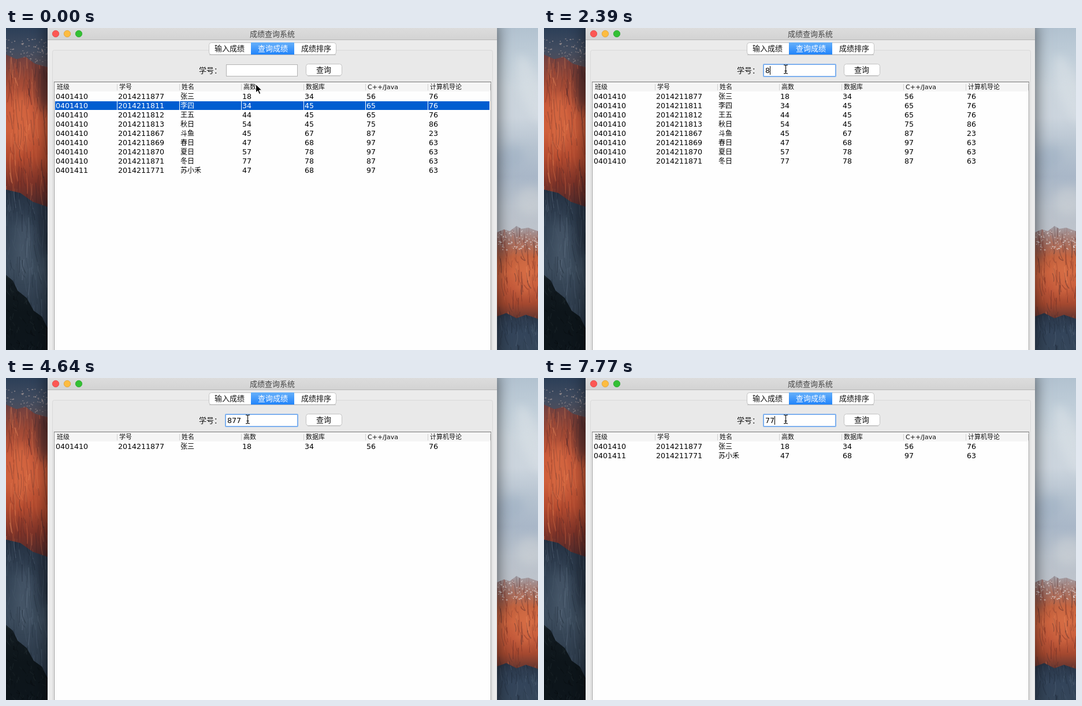
These frames come from a looping animation (921 px wide and 558 px high, 8 s). An HTML page with a canvas:

```html
<!DOCTYPE html>
<html lang="zh-CN">
<head>
<meta charset="utf-8">
<title>成绩查询系统</title>
<style>
html, body { margin: 0; width: 100%; height: 100%; overflow: hidden; background: #ebebeb; }
canvas, svg { position: absolute; left: 0; top: 0; display: block; }
text { font-family: "DejaVu Sans", "Noto Sans CJK SC", "Noto Sans CJK", sans-serif; white-space: pre; }
.ui { font-size: 13px; fill: #111; }
.head { font-size: 11px; fill: #111; }
.number { font-size: 12.6px; }
.name { font-size: 12px; }
</style>
</head>
<body>
<canvas id="wallpaper" width="921" height="558"></canvas>
<svg width="921" height="558" viewBox="0 0 921 558">
  <defs>
    <linearGradient id="bar" x2="0" y2="1"><stop stop-color="#dcdcdc"/><stop offset="1" stop-color="#d3d3d3"/></linearGradient>
    <linearGradient id="blue" x2="0" y2="1"><stop stop-color="#66b0fa"/><stop offset="1" stop-color="#2184fb"/></linearGradient>
  </defs>
  <path fill="#ebebeb" d="M72 0H850V558H72Z"/>
  <path fill="url(#bar)" d="M72 0H850V20H72Z"/>
  <path fill="#b6b6b6" d="M72 20H850V21H72Z"/>
  <circle cx="86" cy="10" r="5.7" fill="#fc5753" stroke="#df4744" stroke-width=".8"/>
  <circle cx="106" cy="10" r="5.7" fill="#fdbc40" stroke="#de9f34" stroke-width=".8"/>
  <circle cx="126" cy="10" r="5.7" fill="#34c034" stroke="#27a52c" stroke-width=".8"/>
  <text class="ui" x="422" y="15" style="fill:#444">成绩查询系统</text>

  <path fill="#e9e9e9" stroke="#d9d9d9" d="M80.5 560V41.5Q80.5 38.5 83.5 38.5H839Q842.5 38.5 842.5 41.5V560"/>
  <rect x="351.5" y="25.5" width="220" height="20.5" rx="4" fill="#fff" stroke="#c3c3c3"/>
  <path d="M352 46.5H571" stroke="#adadad" stroke-width=".7"/>
  <rect x="424" y="25" width="75" height="21" fill="url(#blue)"/>
  <text class="ui" x="361" y="40">输入成绩</text>
  <text class="ui" x="436" y="40" style="fill:#fff">查询成绩</text>
  <text class="ui" x="511" y="40">成绩排序</text>

  <text class="ui" x="334" y="78">学号：</text>
  <rect x="381.5" y="63.5" width="123" height="20" fill="#fff" stroke="#b3b3b3"/>
  <rect id="focus" x="380" y="63" width="125" height="21" rx="1" fill="#fff" stroke="#7db0ee" stroke-width="2"/>
  <rect x="519.5" y="62.5" width="62" height="20" rx="4" fill="#fff" stroke="#c3c3c3"/>
  <path d="M522 83H579" stroke="#adadad" stroke-width=".7"/>
  <text class="ui" x="537" y="77">查询</text>
  <text id="query" class="number" x="383" y="78"></text>
  <path id="caret" d="M0 66h1v15h-1z"/>

  <path fill="#fefefe" stroke="#999" d="M83.5 560V93.5H839.5V560"/>
  <path fill="#f5f5f5" d="M84 94H839V110H84Z"/>
  <path stroke="#777" d="M83 93.5H840"/>
  <g id="header"></g>
  <g id="rows"></g>

  <path id="arrow" stroke="#fff" d="M0 0V14.5L3.4 11.3 5.8 17 8.2 16 5.8 10.4H10.3Z"/>
  <path id="beam" fill="none" stroke="#222" stroke-width="1.3" d="M-3.5-7.3H-2Q0-7.3 0-5.5V5.500Q0 7.3-2 7.3H-3.5M3.5-7.3H2Q0-7.3 0-5.5M3.5 7.3H2Q0 7.3 0 5.5M-2 3H2"/>
</svg>
<script>
const $ = id => document.getElementById(id);
const LOOP = 8000, FOCUS_AT = 890, FIRST_KEY = 2390;

// ---- wallpaper ----
const ctx = $("wallpaper").getContext("2d");
let seed = 11;
const random = () => (seed = seed * 16807 % 2147483647) / 2147483647;
const between = (a, b) => a + random() * (b - a);

function fillBands(x, y, width, height, colors) {
  const g = ctx.createLinearGradient(0, y, 0, y + height);
  colors.forEach((c, i) => g.addColorStop(i / (colors.length - 1), c));
  ctx.fillStyle = g;
  ctx.fillRect(x, y, width, height);
}

// A soft patch of light or shade.
function patch(x, y, rx, ry, color, tilt = 0) {
  ctx.save();
  ctx.filter = "blur(8px)";
  ctx.fillStyle = color;
  ctx.beginPath();
  ctx.ellipse(x, y, rx, ry, tilt, 0, 7);
  ctx.fill();
  ctx.restore();
}

// A rock face inside an outline: colour bands, soft patches, then steep random cracks.
function cliff({ outline, x, y, height, bands, patches = [], cracks, count, length }) {
  ctx.save();
  ctx.clip(new Path2D(outline));
  fillBands(x, y, 72, height, bands);
  patches.forEach(p => patch(...p));
  for (let i = 0; i < count; i++) {
    const left = between(x, x + 72), top = between(y - length / 2, y + height);
    const drop = length * between(.2, 1.1);
    ctx.globalAlpha = between(.12, .45);
    ctx.strokeStyle = cracks[Math.floor(random() * cracks.length)];
    ctx.lineWidth = between(.5, 1.8);
    ctx.beginPath();
    ctx.moveTo(left, top);
    ctx.quadraticCurveTo(left + between(-3, 4), top + drop / 2, left + between(-3, 7), top + drop);
    ctx.stroke();
  }
  ctx.restore();
}

function specks(x0, y0, x1, y1, count, color) {
  ctx.fillStyle = color;
  for (let i = 0; i < count; i++)
    ctx.fillRect(between(x0, x1), between(y0, y1), between(1, 3), between(1, 2));
}

function paintWallpaper() {
  const ember = ["#4a2024", "#e88a5c", "#7c2f22", "#d9663e", "#30242c"];
  const slate = ["#141d29", "#5d6e80", "#222e3d", "#4a5b6d"];

  fillBands(0, 0, 72, 80, ["#2c3f58", "#434d60", "#5f4b4e"]);
  specks(0, 18, 72, 66, 90, "#b9a6a490");
  cliff({
    outline: "M0 46L18 54 34 50 50 62 72 68V312L0 284Z", x: 0, y: 46, height: 266,
    bands: ["#6b3f40", "#a04a36", "#c8593a", "#cb5b39", "#b64c30", "#7e3328", "#4c2a2c"],
    patches: [[66, 100, 14, 45, "#35222ca0"], [24, 165, 20, 50, "#dc704680"]],
    cracks: ember, count: 190, length: 50
  });
  cliff({
    outline: "M0 280L25 286 46 301 72 310V558H0Z", x: 0, y: 278, height: 280,
    bands: ["#232f40", "#354557", "#3b4b5c", "#2d3b4b", "#1c2734"],
    patches: [[30, 380, 14, 50, "#52637480"], [64, 350, 10, 50, "#1c273480"]],
    cracks: slate, count: 190, length: 48
  });
  cliff({
    outline: "M0 428L12 438 20 455 36 468 48 490 62 500 72 520V558H0Z", x: 0, y: 428, height: 130,
    bands: ["#131c22", "#0d151a", "#0d151b"], cracks: ["#2a3639", "#05090c"], count: 150, length: 9
  });

  fillBands(850, 0, 71, 360, ["#b2c2d0", "#c0ced9", "#ccd6de", "#ccd5de", "#b6c3d0", "#a9b7c8", "#bac3cd", "#bec3cb"]);
  patch(908, 105, 18, 60, "#dae1e690", -.3);
  patch(872, 225, 26, 20, "#9dafc480", -.4);
  patch(908, 300, 24, 24, "#cfd3d880");
  cliff({
    outline: "M850 354L862 349 872 352 884 343 892 348 904 346 921 352V515H850Z", x: 850, y: 343, height: 162,
    bands: ["#a3a1a9", "#a57468", "#c4633f", "#cf6540", "#c4593a", "#a54930", "#5e3430"],
    patches: [[858, 385, 9, 22, "#68434680"], [900, 430, 18, 35, "#db754a70"]],
    cracks: ember, count: 130, length: 34
  });
  specks(850, 350, 921, 384, 90, "#ddd6d6b0");
  cliff({
    outline: "M850 500L866 494 884 503 900 497 921 504V558H850Z", x: 850, y: 494, height: 64,
    bands: ["#283446", "#33445a", "#35465a"], cracks: slate, count: 80, length: 24
  });

  ctx.shadowColor = "#0009";
  ctx.shadowBlur = 26;
  ctx.fillStyle = "#ebebeb";
  ctx.fillRect(72, -10, 778, 620);
}

// ---- table ----
const headings = ["班级", "学号", "姓名", "高数", "数据库", "C++/Java", "计算机导论"];
const records = `0401410 2014211877 张三 18 34 56 76
0401410 2014211811 李四 34 45 65 76
0401410 2014211812 王五 44 45 65 76
0401410 2014211813 秋日 54 45 75 86
0401410 2014211867 斗鱼 45 67 87 23
0401410 2014211869 春日 47 68 97 63
0401410 2014211870 夏日 57 78 97 63
0401410 2014211871 冬日 77 78 87 63
0401411 2014211771 苏小禾 47 68 97 63`.split("\n").map(line => line.split(" "));
const SELECTED_ID = "2014211811";

const columnX = i => Math.round(84.4 + i * 107.6);
const separators = (y, height, color) => headings.map((_, i) =>
  `<rect x="${columnX(i + 1)}" y="${y}" width="1" height="${height}" fill="${color}"/>`).join("");

$("header").innerHTML = separators(97, 11, "#cfcfcf") + headings.map((h, i) =>
  `<text class="head" x="${columnX(i) + 4}" y="106">${h}</text>`).join("");

function rowMarkup(record, index, selected) {
  const top = 111 + index * 16;
  const cells = record.map((value, i) =>
    `<text class="${i === 2 ? "name" : "number"}" x="${columnX(i) + 2}" y="${top + 12}">${value}</text>`).join("");
  if (!selected) return cells;
  return `<rect x="85" y="${top}" width="752" height="15" fill="#005dd0"/>`
    + separators(top, 15, "#fff") + `<g fill="#fff">${cells}</g>`;
}

// ---- timeline ----
const queries = [[0, ""], [FIRST_KEY, "8"], [3890, "87"], [4040, "877"], [5090, "87"],
  [5380, "8"], [5530, ""], [7170, "7"], [7770, "77"]];
const caretToggles = [FOCUS_AT, 1340, 1940, 2840, 3440, 4640, 5090, 5980, 6580, 7030, 7170, 7620, 7770];
const pointers = [[0, "arrow", 432.5, 97.5], [150, "arrow", 436.5, 96.5],
  [290, "beam", 426, 84], [440, "beam", 421, 77], [590, "beam", 418.5, 71.5]];

const latest = (steps, t) => steps.filter(step => step[0] <= t).pop();
const show = (id, visible) => $(id).setAttribute("visibility", visible ? "visible" : "hidden");

let shown;
function render(t) {
  const query = latest(queries, t)[1];
  const hasSelection = t < FIRST_KEY;
  const key = query + hasSelection;
  if (key !== shown) {
    shown = key;
    $("query").textContent = query;
    $("rows").innerHTML = records.filter(r => r[1].includes(query))
      .map((r, i) => rowMarkup(r, i, hasSelection && r[1] === SELECTED_ID)).join("");
  }
  show("focus", t >= FOCUS_AT);
  show("caret", caretToggles.filter(time => time <= t).length % 2);
  $("caret").setAttribute("transform", `translate(${383 + query.length * 8})`);

  const [, kind, x, y] = latest(pointers, t);
  show("arrow", kind === "arrow");
  show("beam", kind === "beam");
  $(kind).setAttribute("transform", `translate(${x} ${y})`);
}

paintWallpaper();
const start = performance.now();
function frame() {
  render((performance.now() - start) % LOOP);
  requestAnimationFrame(frame);
}
frame();
</script>
</body>
</html>
```
